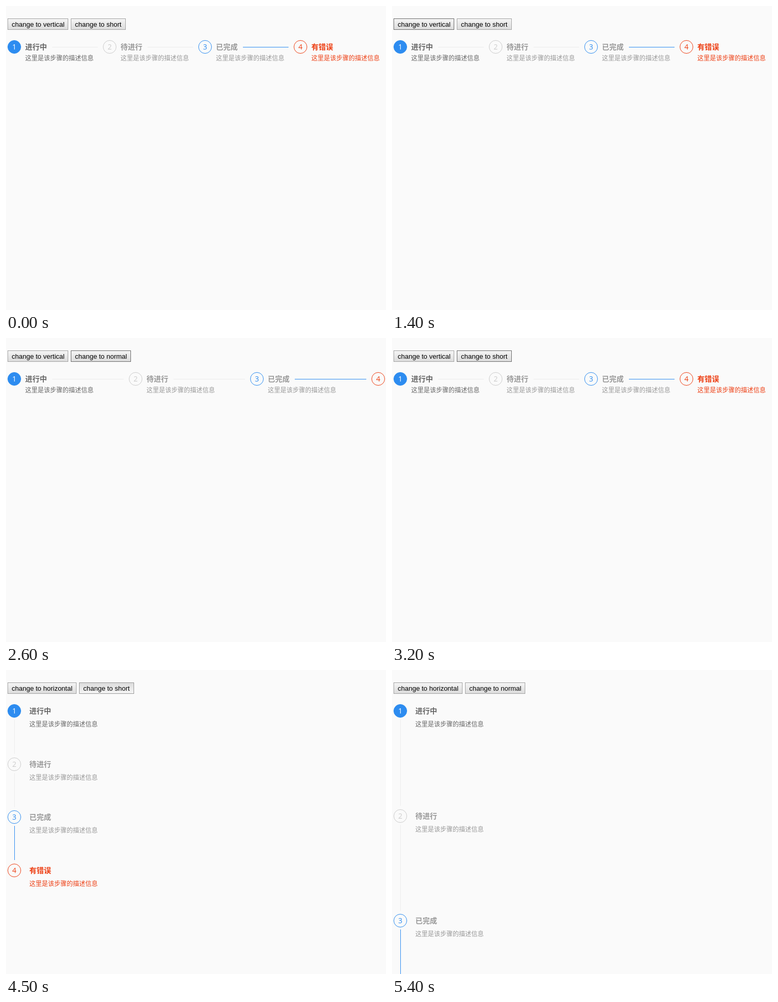
An HTML page that plays this animation: 733 by 587 pixels, repeating every 6.2 s.

```html
<!DOCTYPE html>
<html lang="zh-CN">
<head>
<meta charset="utf-8">
<title>Steps</title>
<style>
  html, body { margin: 0; width: 100%; height: 100%; overflow: hidden; background: #fafafa; }
  svg { display: block; }
  text { font-family: "Noto Sans CJK SC", "Noto Sans CJK JP", "Noto Sans CJK", sans-serif; }
  .btn text { font: 13px "Liberation Sans", Arial, sans-serif; fill: #000; }
  .num { font: 14px "Open Sans", "Noto Sans", sans-serif; text-anchor: middle; }
  .title { font-size: 14px; font-weight: 700; }
  .desc { font-size: 12px; }
</style>
</head>
<body>
<svg id="stage" width="733" height="587" viewBox="0 0 733 587">
  <defs>
    <linearGradient id="up" x2="0" y2="1">
      <stop stop-color="#f5f5f5"/><stop offset="1" stop-color="#dcdcdc"/>
    </linearGradient>
    <linearGradient id="down" x2="0" y2="1">
      <stop stop-color="#dcdcdc"/><stop offset="1" stop-color="#f5f5f5"/>
    </linearGradient>
  </defs>
</svg>
<script>
const LOOP = 6200;
const DESC = '这里是该步骤的描述信息';
const STEPS = [
  { title: '进行中', text: '#666', ring: '#2d8cf0', fill: '#2d8cf0', num: '#fff', tail: '#ececed' },
  { title: '待进行', text: '#999', ring: '#ccc', num: '#ccc', tail: '#ececed' },
  { title: '已完成', text: '#999', ring: '#2d8cf0', num: '#2d8cf0', tail: '#2d8cf0' },
  { title: '有错误', text: '#ed3f14', ring: '#ed3f14', num: '#ed3f14' }
];
const GAP = {
  horizontal: { normal: 184, short: 134, long: 234 },
  vertical: { normal: 102.5, short: 52.5, long: 202.5 }
};
const NEXT = { horizontal: 'vertical', vertical: 'horizontal', normal: 'short', short: 'long', long: 'normal' };
const BTN_WIDTH = { vertical: 117, horizontal: 133, short: 106, long: 102, normal: 116 };

// time, layout, size, hovered button, pressed button
const TIMELINE = [
  [0, 'horizontal', 'normal', 0, 0],
  [300, 'horizontal', 'normal', 1, 0],
  [700, 'horizontal', 'normal', 0, 1],
  [800, 'vertical', 'normal', 1, 0],
  [1300, 'vertical', 'normal', 0, 1],
  [1400, 'horizontal', 'normal', 1, 0],
  [1600, 'horizontal', 'normal', 2, 0],
  [2000, 'horizontal', 'normal', 0, 2],
  [2100, 'horizontal', 'short', 2, 0],
  [2500, 'horizontal', 'short', 0, 2],
  [2600, 'horizontal', 'long', 2, 0],
  [3100, 'horizontal', 'long', 0, 2],
  [3200, 'horizontal', 'normal', 2, 0],
  [3600, 'horizontal', 'normal', 1, 0],
  [3900, 'horizontal', 'normal', 0, 1],
  [4000, 'vertical', 'normal', 1, 0],
  [4300, 'vertical', 'normal', 0, 0],
  [4400, 'vertical', 'normal', 2, 0],
  [4500, 'vertical', 'normal', 0, 2],
  [4600, 'vertical', 'short', 2, 0],
  [4700, 'vertical', 'short', 0, 2],
  [4900, 'vertical', 'long', 2, 0],
  [5400, 'vertical', 'long', 0, 0]
];

const stage = document.getElementById('stage');

function set(node, attrs) {
  for (const key in attrs) node.setAttribute(key, attrs[key]);
}

function add(parent, tag, attrs, text) {
  const node = document.createElementNS('http://www.w3.org/2000/svg', tag);
  set(node, attrs);
  if (text) node.textContent = text;
  parent.appendChild(node);
  return node;
}

const buttons = [1, 2].map(id => {
  const g = add(stage, 'g', { class: 'btn' });
  return {
    id,
    box: add(g, 'rect', { y: 24.5, height: 21 }),
    label: add(g, 'text', { y: 40 })
  };
});

const steps = STEPS.map((s, i) => {
  const g = add(stage, 'g', {});
  add(g, 'circle', { cx: 13, cy: 13, r: 12.5, fill: s.fill || 'none', stroke: s.ring });
  add(g, 'text', { class: 'num', x: 13, y: 18, fill: s.num }, String(i + 1));
  const item = {
    g,
    head: add(g, 'text', { class: 'title', y: 18, fill: s.text }, s.title),
    lines: [0, 1].map(() => add(g, 'text', { class: 'desc', fill: s.text }))
  };
  if (s.tail) item.tail = add(g, 'rect', { fill: s.tail });
  return item;
});

function drawButton(button, x, target, hover, press) {
  const width = BTN_WIDTH[target];
  const pressed = press === button.id;
  const stroke = hover === button.id ? '#6b6b6b' : pressed ? '#999' : '#a3a3a3';
  set(button.box, { x: x + 0.5, width: width - 1, stroke, fill: pressed ? 'url(#down)' : 'url(#up)' });
  set(button.label, { x: x + 8 });
  button.label.textContent = 'change to ' + target;
  return x + width + 5;
}

function drawStep(step, i, layout, size) {
  const flat = layout === 'horizontal';
  const gap = GAP[layout][size];
  const x = flat ? 3 + i * gap : 3;
  const y = flat ? 66 : Math.round(66 + i * gap);
  const left = flat ? 34 : 42;
  const split = flat && size === 'short' ? 8 : DESC.length;
  set(step.g, { transform: `translate(${x} ${y})` });
  set(step.head, { x: left });
  step.lines.forEach((line, n) => {
    set(line, { x: left, y: (flat ? 39 : 43) + n * 16 });
    line.textContent = n ? DESC.slice(split) : DESC.slice(0, split);
  });
  if (!step.tail) return;
  set(step.tail, flat
    ? { x: 86, y: 13, width: gap - 96, height: 1 }
    : { x: 13, y: 30, width: 1, height: Math.floor(gap - 36.5) });
}

let shown;
function render(time) {
  const state = TIMELINE.filter(s => s[0] <= time).pop();
  if (state === shown) return;
  shown = state;
  const [, layout, size, hover, press] = state;
  const x = drawButton(buttons[0], 3, NEXT[layout], hover, press);
  drawButton(buttons[1], x, NEXT[size], hover, press);
  steps.forEach((step, i) => drawStep(step, i, layout, size));
}

const start = performance.now();
function tick() {
  render((performance.now() - start) % LOOP);
  requestAnimationFrame(tick);
}
tick();
</script>
</body>
</html>
```
